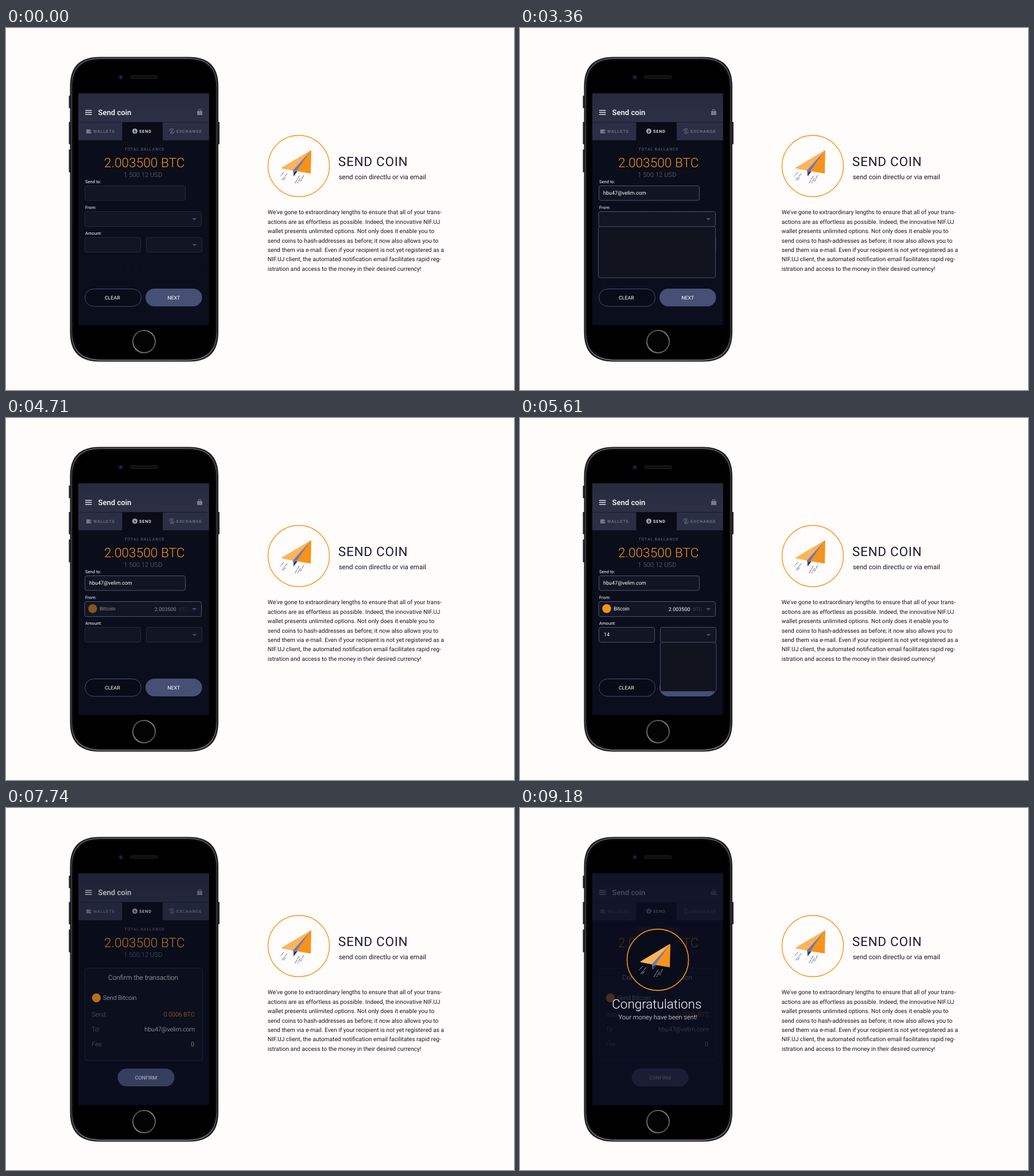
Write an HTML page that moves like this. It is 885 px wide and 632 px high and loops after 9.45 s.

```html
<!DOCTYPE html>
<html lang="en">
<head>
<meta charset="utf-8">
<title>Send coin</title>
<style>
  html, body { margin: 0; width: 100%; height: 100%; overflow: hidden; background: #fffcfc; }
  .stage { position: relative; width: 885px; height: 632px; overflow: hidden; }
  svg { display: block; }
  text { font-family: Roboto, "Open Sans", sans-serif; text-rendering: geometricPrecision; fill: #fff; white-space: pre; }

  .end { text-anchor: end; }
  .mid { text-anchor: middle; }
  .light { font-weight: 300; }
  .label { font-size: 7.6px; }
  .value { font-size: 9px; }
  .unit { font-size: 9px; fill: #363e66; }
  .btn { font-size: 8.8px; text-anchor: middle; }
  .tab { font-size: 7.2px; font-weight: 500; letter-spacing: .9px; fill: #777b8d; }
  .row { font-size: 10.7px; font-weight: 300; }
  .dim { fill: #7b7f92; }
  .copy { font-size: 10.25px; fill: #16171f; }
  .field { fill: #121523; stroke: #25293a; }
  .panel { fill: #11141f; stroke: #4a4f66; opacity: 0; }

  /* every track runs on the same 9450 ms loop */
  .a { animation: 9450ms linear infinite; }

  .to { animation-name: to; }
  .from { animation-name: from; }
  .amount { animation-name: amount; }
  .into { animation-name: into; }
  @keyframes to     { 0%, .4%    { stroke: #25293a } 4.44%, 100%  { stroke: #50556d } }
  @keyframes from   { 0%, 28.9%  { stroke: #25293a } 30.5%, 100%  { stroke: #50556d } }
  @keyframes amount { 0%, 52.5%  { stroke: #25293a } 53.97%, 100% { stroke: #50556d } }
  @keyframes into   { 0%, 55.8%  { stroke: #25293a } 57.14%, 100% { stroke: #50556d } }

  .drop1 { animation-name: drop1; }
  @keyframes drop1 {
    0%, 31.9%  { y: 346.5px; height: 0; opacity: 0 }
    32%        { y: 346.5px; height: 0; opacity: 1; animation-timing-function: ease-in-out }
    35.56%     { y: 346.5px; height: 89.5px; animation-timing-function: ease-out }
    37.5%      { y: 350.5px; height: 99px; animation-timing-function: ease-in-out }
    39.7%, 44% { y: 350.5px; height: 91px; animation-timing-function: ease-in-out }
    47.6%      { y: 346.5px; height: 0; opacity: 1 }
    47.7%, 100% { y: 346.5px; height: 0; opacity: 0 }
  }
  .drop2 { animation-name: drop2; }
  @keyframes drop2 {
    0%, 55.8%  { y: 391.5px; height: 0; opacity: 0 }
    55.9%      { y: 391.5px; height: 0; opacity: 1; animation-timing-function: ease-in-out }
    59.37%     { y: 391.5px; height: 86px; animation-timing-function: ease-out }
    62.4%      { y: 395.5px; height: 98px; animation-timing-function: ease-in-out }
    63.8%, 65.5% { y: 395.5px; height: 91px; animation-timing-function: ease-in-out }
    68.25%     { y: 391.5px; height: 0; opacity: 1 }
    68.35%, 100% { y: 391.5px; height: 0; opacity: 0 }
  }
  .list1, .pick1, .got1, .list2, .got2, .press1, .press2, .shade, .congrats, .coins { opacity: 0; }
  .list1 { animation-name: list1; }
  .pick1 { animation-name: pick1; }
  .got1 { animation-name: got1; }
  .list2 { animation-name: list2; }
  .got2 { animation-name: got2; }
  @keyframes list1 { 0%, 36.5% { opacity: 0 } 39.4%, 42.8% { opacity: 1 } 44.4%, 100% { opacity: 0 } }
  @keyframes pick1 { 0%, 39.4% { opacity: 0 } 41.9%, 100% { opacity: 1 } }
  @keyframes got1  { 0%, 48.2% { opacity: 0 } 51.4%, 100% { opacity: 1 } }
  @keyframes list2 { 0%, 61% { opacity: 0 } 62.6%, 65% { opacity: 1 } 66%, 100% { opacity: 0 } }
  @keyframes got2  { 0%, 67.3% { opacity: 0 } 69.2%, 100% { opacity: 1 } }

  .press1 { animation-name: press1; animation-timing-function: step-end; }
  .press2 { animation-name: press2; animation-timing-function: step-end; }
  @keyframes press1 { 0%, 73.01% { opacity: 0 } 72.69% { opacity: 1 } }
  @keyframes press2 { 0%, 79.67% { opacity: 0 } 79.04% { opacity: 1 } }

  .pages { animation-name: slide; }
  @keyframes slide {
    0%, 74.5% { transform: translateX(0); animation-timing-function: ease-in-out }
    76.51%, 100% { transform: translateX(-244px) }
  }
  .shade { animation-name: shade; }
  .congrats { animation-name: congrats; }
  @keyframes shade { 0%, 79.7% { opacity: 0 } 86%, 100% { opacity: .75 } }
  @keyframes congrats { 0%, 91.4% { opacity: 0 } 96.5%, 100% { opacity: 1 } }

  .coins { position: absolute; left: 185px; top: 210px; width: 110px; height: 110px; animation-name: coins; }
  .coins svg { position: absolute; inset: 0; color: #9096c4; animation-name: spin; }
  @keyframes coins { 0%, 87.5% { opacity: 0 } 88.15%, 100% { opacity: 1 } }
  @keyframes spin {
    0%, 87.64% { transform: rotateY(540deg); animation-timing-function: cubic-bezier(.25, 1, .5, 1) }
    97.14%, 100% { transform: rotateY(0deg) }
  }

  .key { animation: long 9450ms step-end infinite; }
  .key.num { animation-name: short; }
  @keyframes long  { 0% { fill-opacity: 1 } 70%, 100% { fill-opacity: 0 } }
  @keyframes short { 0% { fill-opacity: 1 } 30%, 100% { fill-opacity: 0 } }
</style>
</head>
<body>
<div class="stage">
<svg width="885" height="632" viewBox="0 0 885 632">
  <defs>
    <linearGradient id="rim" x1="0" y1="0" x2="0" y2="1">
      <stop offset="0" stop-color="#5d5f63"/><stop offset=".1" stop-color="#3c3e42"/>
      <stop offset=".9" stop-color="#3c3e42"/><stop offset="1" stop-color="#77797d"/>
    </linearGradient>
    <linearGradient id="home" x1="0" y1="0" x2="1" y2="1">
      <stop offset="0" stop-color="#3a3a3a"/><stop offset=".5" stop-color="#8b8b8b"/><stop offset="1" stop-color="#3a3a3a"/>
    </linearGradient>
    <linearGradient id="head" x1="0" y1="0" x2="0" y2="1">
      <stop offset="0" stop-color="#272a3d"/><stop offset="1" stop-color="#2d3146"/>
    </linearGradient>
    <linearGradient id="back" x1="0" y1="0" x2="0" y2="1">
      <stop offset="0" stop-color="#0a0d19"/><stop offset="1" stop-color="#0b0e1d"/>
    </linearGradient>
    <clipPath id="screen"><rect x="126" y="114" width="227.700" height="404.500"/></clipPath>
    <path id="shell" d="M-129.250-214c0-35.300 16.700-52 52-52H77.250c35.300 0 52 16.700 52 52V214c0 35.300-16.700 52-52 52H-77.250c-35.300 0-52-16.700-52-52Z"/>
    <path id="caret" d="M-4-2H4L0 2Z"/>
    <g id="plane" stroke-linejoin="round" stroke-width="1">
      <path d="M531 214L479.800 244.500L500 248.500Z" fill="#fdb45a" stroke="#fdb45a"/>
      <path d="M531 214L500 248.500L501 259Z" fill="#7079b0"/>
      <path d="M501 259L502 251.500L508 250Z" fill="#2d325f"/>
      <path d="M531.300 214L530.500 253.500L506.500 249.500Z" fill="#f7931a" stroke="#f7931a"/>
      <path d="M484 252L477.500 259M490 254L480 266M487 261L483 266M511 258L503.500 271M518.500 257L513 268M513 262L508 271"
        fill="none" stroke="currentColor" stroke-width=".9" stroke-dasharray="7 1"/>
    </g>
  </defs>

  <!-- phone -->
  <g fill="#25272b">
    <rect x="109.500" y="118" width="5" height="22" rx="1"/>
    <rect x="109.500" y="164" width="5" height="39" rx="1"/>
    <rect x="109.500" y="212" width="5" height="40" rx="1"/>
    <rect x="367" y="164" width="5" height="39" rx="1"/>
  </g>
  <g transform="translate(240.750 316.500)">
    <use href="#shell" fill="#1a1b1e"/>
    <use href="#shell" transform="scale(.979 .990)" fill="#000" stroke="url(#rim)" stroke-width="1.800"/>
    <use href="#shell" transform="scale(.960 .980)" fill="#000" stroke="#141416"/>
  </g>
  <circle cx="200" cy="86" r="4.500" fill="#0c0d1c"/>
  <circle cx="200" cy="86" r="2.400" fill="#1c2160"/>
  <rect x="217" y="83.500" width="47" height="4.500" rx="2.250" fill="#0b0b0c" stroke="#2a2a2c"/>
  <circle cx="240.500" cy="547.500" r="19.500" fill="#030303" stroke="url(#home)" stroke-width="2"/>

  <g clip-path="url(#screen)">
    <rect x="126" y="114" width="228" height="405" fill="url(#back)"/>
    <rect x="126" y="114" width="228" height="50.500" fill="url(#head)"/>
    <rect x="126" y="164.500" width="228" height="31.500" fill="#2b2f45"/>
    <path d="M126 164.500H354" stroke="#181b2b"/>
    <rect x="202.400" y="164.500" width="70.600" height="32" fill="#090c17"/>
    <path d="M138 143.800H149.500M138 147.300H149.500M138 150.800H149.500" stroke="#fff" stroke-width="1.300"/>
    <text x="160.500" y="152" font-size="13.100" font-weight="500">Send coin</text>
    <g fill="#777b8d">
      <path d="M333 145H342V152H333Z"/>
      <path d="M335.500 145V142.500H339.500V145" fill="none" stroke="#777b8d"/>
      <path d="M140 177H147V178.500H148.500V184H140Z"/>
      <circle cx="289" cy="180" r="4.300" fill="none" stroke="#777b8d" stroke-dasharray="10 3.500"/>
      <path d="M287 179H291L290 177.500M291 181.500H287L288 183" fill="none" stroke="#777b8d" stroke-width=".9"/>
    </g>
    <rect x="145.500" y="180" width="3" height="1.600" fill="#2b2f45"/>
    <circle cx="224.500" cy="180" r="4.500" fill="#a3a6b2"/>
    <path d="M224.500 177.500V182M222.500 180.300L224.500 182.300L226.500 180.300" fill="none" stroke="#090c17"/>
    <text class="tab" x="152" y="182.700">WALLETS</text>
    <text class="tab" x="232" y="182.700" style="fill:#fff">SEND</text>
    <text class="tab" x="297" y="182.700">EXCHANGE</text>

    <text x="206.500" y="214.200" font-size="7" letter-spacing=".9" style="fill:#666a7d">TOTAL BALLANCE</text>
    <text class="mid light" x="241.200" y="243" font-size="22.700" style="fill:#f7931a">2.003500 BTC</text>
    <text class="mid light" x="238.800" y="260" font-size="11.300" style="fill:#6b6f83">1 500.12 USD</text>

    <g class="a pages">
      <!-- form -->
      <text class="label" x="138" y="270.500">Send to:</text>
      <rect class="field a to" x="137.500" y="275.500" width="175" height="25.500" rx="3"/>
      <text class="value" id="mail" x="145" y="290.500"></text>

      <text class="label" x="138" y="315.500">From:</text>
      <rect class="field a from" x="137" y="320.500" width="203.500" height="26" rx="3"/>
      <use href="#caret" x="328" y="334" fill="#454d7c"/>
      <g class="a got1">
        <circle cx="151" cy="332.800" r="7.700" fill="#f7931a"/>
        <text class="value" x="163" y="335.500">Bitcoin</text>
        <text class="value end" x="296.500" y="336.700">2.003500</text>
        <text class="unit" x="301" y="336.700">BTC</text>
      </g>

      <text class="label" x="138" y="360.500">Amount:</text>
      <rect class="field a amount" x="137.500" y="365.500" width="97" height="26" rx="3"/>
      <text class="value" id="sum" x="146" y="381"></text>
      <rect class="field a into" x="244.500" y="365.500" width="97" height="26" rx="3"/>
      <use href="#caret" x="328.500" y="379" fill="#474b62"/>
      <g class="a got2">
        <circle cx="258.500" cy="378.800" r="7.700" fill="#2d3252"/>
        <text class="value" x="270.300" y="382">Etherum</text>
      </g>

      <rect x="137.500" y="455.500" width="98" height="30.500" rx="15.250" fill="#090c18" stroke="#454c70"/>
      <text class="btn" x="185.300" y="473.600">CLEAR</text>
      <rect x="243" y="455" width="98.500" height="31" rx="15.500" fill="#465075"/>
      <rect class="a press1" x="243" y="455" width="98.500" height="31" rx="15.500" fill="#5b6690"/>
      <text class="btn" x="292.300" y="473.600">NEXT</text>

      <rect class="panel a drop1" x="136.500" y="346.500" width="204" height="0" rx="3"/>
      <g class="a list1">
        <g class="a pick1">
          <rect x="137" y="381" width="203" height="27.500" fill="#272b40"/>
          <path d="M323.500 393.500L327 397.500L331 393" fill="none" stroke="#4bb02a" stroke-width="1.500"/>
        </g>
        <circle cx="151" cy="367" r="7.700" fill="#3ba31c"/>
        <text class="mid light" x="151" y="371.300" font-size="12">$</text>
        <circle cx="151" cy="395" r="7.700" fill="#f7931a"/>
        <circle cx="151" cy="424" r="7.700" fill="#2b22a6"/>
        <text class="mid light" x="150.700" y="428" font-size="11.500">€</text>
        <text class="value" x="164.300" y="370.200">Dollars</text>
        <text class="value" x="164.300" y="398.200">Bitcoin</text>
        <text class="value" x="164.300" y="427.200">Euro</text>
        <text class="value end" x="296.500" y="370.200">1 500.12</text>
        <text class="value end" x="296.500" y="398.200">2.003500</text>
        <text class="value end" x="296.500" y="427.200">1 408.49</text>
        <text class="unit" x="301" y="370.200">USD</text>
        <text class="unit" x="301" y="398.200">BTC</text>
        <text class="unit" x="301" y="427.200">EUR</text>
      </g>

      <rect class="panel a drop2" x="244.500" y="391.500" width="97.500" height="0" rx="3"/>
      <g class="a list2">
        <rect x="245" y="427" width="96.500" height="27.500" fill="#272b40"/>
        <circle cx="258.500" cy="412" r="7.700" fill="#3ba31c"/>
        <text class="mid light" x="258.500" y="416.300" font-size="12">$</text>
        <circle cx="258.500" cy="440.500" r="7.700" fill="#2d3252"/>
        <circle cx="258.500" cy="469" r="7.700" fill="#2b22a6"/>
        <text class="mid light" x="258.200" y="473" font-size="11.500">€</text>
        <text class="value" x="270.300" y="415.200">Dollars</text>
        <text class="value" x="270.300" y="443.700">Etherum</text>
        <text class="value" x="270.300" y="472.200">Euro</text>
      </g>

      <!-- confirmation -->
      <g transform="translate(244)">
        <rect x="137.500" y="279.500" width="205" height="161" rx="3" fill="#0d101d" stroke="#25293a"/>
        <text class="mid light" x="239" y="299.700" font-size="11.800">Confirm the transaction</text>
        <circle cx="157.500" cy="331.500" r="7.700" fill="#f7931a"/>
        <text class="row" x="169" y="335.200">Send Bitcoin</text>
        <text class="row dim" x="149.500" y="364">Send:</text>
        <text class="row end" x="329" y="364" style="fill:#f7931a">0.0006 BTC</text>
        <text class="row dim" x="149.500" y="390.300">To:</text>
        <text class="row end" x="329" y="390.300">hbu47@velim.com</text>
        <text class="row dim" x="149.500" y="416.300">Fee:</text>
        <text class="row end" x="328" y="416.300">0</text>
        <rect x="194.500" y="455" width="99" height="31" rx="15.500" fill="#465075"/>
        <rect class="a press2" x="194.500" y="455" width="99" height="31" rx="15.500" fill="#5b6690"/>
        <text class="btn" x="244" y="473.600">CONFIRM</text>
      </g>
    </g>

    <rect class="a shade" x="126" y="114" width="228" height="405" fill="#0b0e20"/>
    <g class="a congrats">
      <text class="mid light" x="238.300" y="350" font-size="22.400">Congratulations</text>
      <text class="mid light" x="240.300" y="368.500" font-size="11.200">Your money have been sent!</text>
    </g>
  </g>

  <!-- description -->
  <circle cx="510" cy="241" r="53.500" fill="none" stroke="#f7931a" stroke-width="1.400"/>
  <use href="#plane" color="#454a8c"/>
  <text x="578.800" y="241" font-size="22.500" letter-spacing=".75" style="fill:#1b1d2b">SEND COIN</text>
  <text x="579.700" y="264" font-size="11.500" style="fill:#16171f">send coin directlu or via email</text>
  <g id="about"></g>
</svg>
<div class="coins a" id="coins"></div>
</div>

<script>
  const LOOP = 9450;
  const $ = id => document.getElementById(id);

  const about = [
    "We've gone to extraordinary lengths to ensure that all of your trans-",
    "actions are as effortless as possible. Indeed, the innovative NIF.UJ",
    "wallet presents unlimited options. Not only does it enable you to",
    "send coins to hash-addresses as before; it now also allows you to",
    "send them via e-mail. Even if your recipient is not yet registered as a",
    "NIF.UJ client, the automated notification email facilitates rapid reg-",
    "istration and access to the money in their desired currency!"
  ];
  $("about").innerHTML = about.map((line, i) =>
    `<text class="copy" x="455.700" y="${325.4 + i * 16.4}">${line}</text>`).join("");

  // each letter shows at its own moment of the loop
  const type = (id, text, timeOf, kind = "") => {
    $(id).innerHTML = [...text].map((c, i) =>
      `<tspan class="key ${kind}" style="animation-delay:${timeOf(i) - LOOP}ms">${c}</tspan>`).join("");
  };
  const tail = [2010, 2130, 2280, 2460];
  type("mail", "hbu47@velim.com", i =>
    i < 2 ? 720 + i * 180 : i < 11 ? 1050 + (i - 2) * 105 : tail[i - 11]);
  type("sum", "14", i => 5070 + i * 120, "num");

  // faint copies run slightly ahead and smear the fast part of the spin
  const coin = (fill, alpha, lead) =>
    `<svg class="a" width="110" height="110" viewBox="455 186 110 110" style="opacity:${alpha};animation-delay:${-lead}ms">
      <circle cx="510" cy="241" r="53.500" fill="${fill}" stroke="#f7931a" stroke-width="1.400"/>
      <use href="#plane"/></svg>`;
  $("coins").innerHTML = coin("#090c19", 1, 0) +
    [1, 2, 3, 4, 5, 6].map(i => coin("none", .14, i * 1.2)).join("");
</script>
</body>
</html>
```
